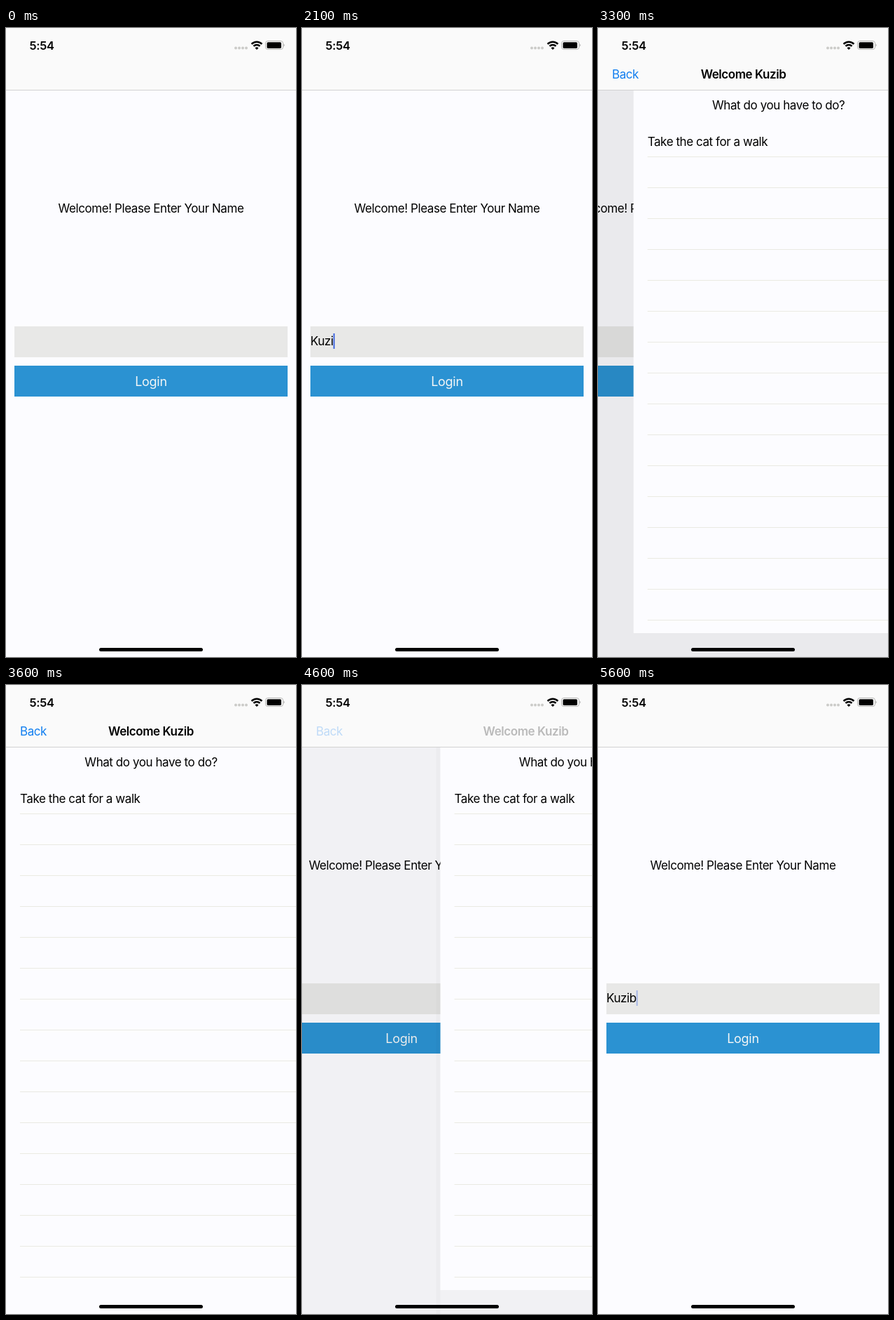
Recreate the animation shown at these times as an HTML page. Size 414x896 px, loop 5.7 s.

```html
<!DOCTYPE html>
<html lang="en">
<head>
<meta charset="utf-8">
<title>Login</title>
<style>
  html, body { margin: 0; width: 100%; height: 100%; overflow: hidden; background: #fcfcff; }
  svg { display: block; width: 414px; height: 896px; }
  text { font: 17px Inter, Roboto, sans-serif; letter-spacing: -0.43px; white-space: pre; }
  .mid { text-anchor: middle; }
  .bold { font-weight: 600; }
</style>
</head>
<body>
<svg viewBox="0 0 414 896" xmlns="http://www.w3.org/2000/svg">
  <rect width="414" height="896" fill="#fcfcff"/>
  <g id="login">
    <text class="mid" x="207" y="263">Welcome! Please Enter Your Name</text>
    <rect x="12" y="425" width="390" height="44" fill="#e8e8e7"/>
    <text id="typed" x="12" y="452"></text>
    <rect id="caret" y="435" width="2" height="22" fill="#4068e0"/>
    <rect x="12" y="481" width="390" height="44" fill="#2b92d2"/>
    <text id="label" class="mid" x="207" y="509.5" fill="#f4f6f6" style="font-size:18px;letter-spacing:-.3px">Login</text>
  </g>
  <rect id="shade" y="89" width="414" height="807"/>

  <g id="todo">
    <rect id="shadow" x="-6" y="89" width="6" height="807"/>
    <rect id="page" y="89" width="414" fill="#fcfcff"/>
    <text class="mid" x="207" y="116">What do you have to do?</text>
    <text x="20" y="167.5">Take the cat for a walk</text>
    <path id="lines" stroke="#eaeae2"/>
  </g>

  <rect width="414" height="88" fill="#fafafa"/>
  <rect y="88" width="414" height="1" fill="#d2d2d2"/>
  <text id="backLink" x="20" y="72" fill="#127ff0">Back</text>
  <text id="title" class="mid bold" y="72">Welcome Kuzib</text>

  <text class="bold" x="33.5" y="30.7" style="font-size:16.5px;letter-spacing:-.3px">5:54</text>
  <g fill="#cbcbc8">
    <circle cx="328" cy="28.5" r="2"/><circle cx="333" cy="28.5" r="2"/>
    <circle cx="338" cy="28.5" r="2"/><circle cx="343" cy="28.5" r="2"/>
  </g>
  <path d="M350.6 22.9A10.3 10.3 0 0 1 365.4 22.9M353.5 25.9A6.2 6.2 0 0 1 362.5 25.9"
        fill="none" stroke="#000" stroke-width="2.6"/>
  <path d="M358 31L355.5 28.5A3.6 3.6 0 0 1 360.5 28.5Z"/>
  <rect x="370.5" y="18.5" width="25" height="12" rx="3.3" fill="none" stroke="#b6b6b4"/>
  <rect x="372.5" y="20.3" width="20.5" height="8.6" rx="1.6"/>
  <path d="M396.5 22.5a2.2 2.2 0 0 1 0 4z" fill="#b6b6b4"/>
  <rect x="133" y="883" width="148" height="5" rx="2.5"/>
</svg>

<script>
const LOOP = 5700, STEP = 100, WIDTH = 414;
const NAME = 'Kuzib';
const KEYS = [1700, 1800, 1900, 2100, 2600];
const PUSH = 3101, PUSH_END = 3600, POP = 4512, POP_END = 5400;

const el = {};
document.querySelectorAll('[id]').forEach(n => el[n.id] = n);
const set = (id, attrs) => {
  for (const k in attrs) el[id].setAttribute(k, attrs[k]);
};
const clamp = x => Math.max(0, Math.min(1, x));

// Critically damped spring: 1 at the start, settling to 0.
const spring = ms => {
  const x = 0.018257 * Math.max(0, ms);
  return (1 + x) * Math.exp(-x);
};

let rows = '';
for (let y = 183.5; y < 850; y += 44) rows += `M20 ${y}H414`;
set('lines', { d: rows });

// Share of the stage width by which the list is still off to the right.
function slide(t) {
  if (t < PUSH) return 1;
  if (t < PUSH_END) return spring(t - PUSH);
  if (t < POP) return 0;
  return t < POP_END ? 1 - spring(t - POP) : 1;
}

function caretAlpha(t) {
  if (t < 1600 || (t >= 2800 && t < POP)) return 0;
  if (t < 5500) return 1;
  return t < 5600 ? 0.75 : 0.4;
}

function pressed(t, start) {
  const p = (t - start) / 300;
  return p < 0 || p >= 1 ? 0 : Math.sin(Math.PI * (0.1 + 0.9 * p));
}

function draw(t) {
  const off = slide(t), resting = off === 0;
  const dim = resting ? 0 : 1 - off;

  set('login', { transform: `translate(${-0.3 * WIDTH * (1 - off)} 0)` });
  set('label', { opacity: 1 - 0.6 * pressed(t, 2800) });
  set('shade', { opacity: 0.08 * dim });

  el.typed.textContent = NAME.slice(0, KEYS.filter(k => t >= k).length);
  const textEnd = 12 + (el.typed.textContent ? el.typed.getComputedTextLength() : 0);
  set('caret', { x: textEnd, opacity: caretAlpha(t) });

  set('todo', {
    transform: `translate(${WIDTH * off} 0)`,
    visibility: t >= 3100 && t < POP_END ? 'visible' : 'hidden'
  });
  set('page', { height: resting ? 807 : 773 });
  set('shadow', { opacity: t < POP ? 0.1 * off ** 2 : Math.min(0.02, dim / 8) });

  // The bar's title runs on its own, slightly earlier than the pages.
  const enter = 1 - (1 - clamp((t - 3000) / 348)) ** 3;
  const leave = clamp((t - 4420) / 240);
  const alpha = enter * (1 - leave);
  set('title', { x: 207 + 207 * (1 - enter) + 150 * leave, opacity: alpha });
  set('backLink', { opacity: alpha * (1 - 0.5 * pressed(t, 4300)) });
}

const start = performance.now();
function tick() {
  const t = (performance.now() - start) % LOOP;
  draw(Math.floor(t / STEP) * STEP);
  requestAnimationFrame(tick);
}
tick();
</script>
</body>
</html>
```
